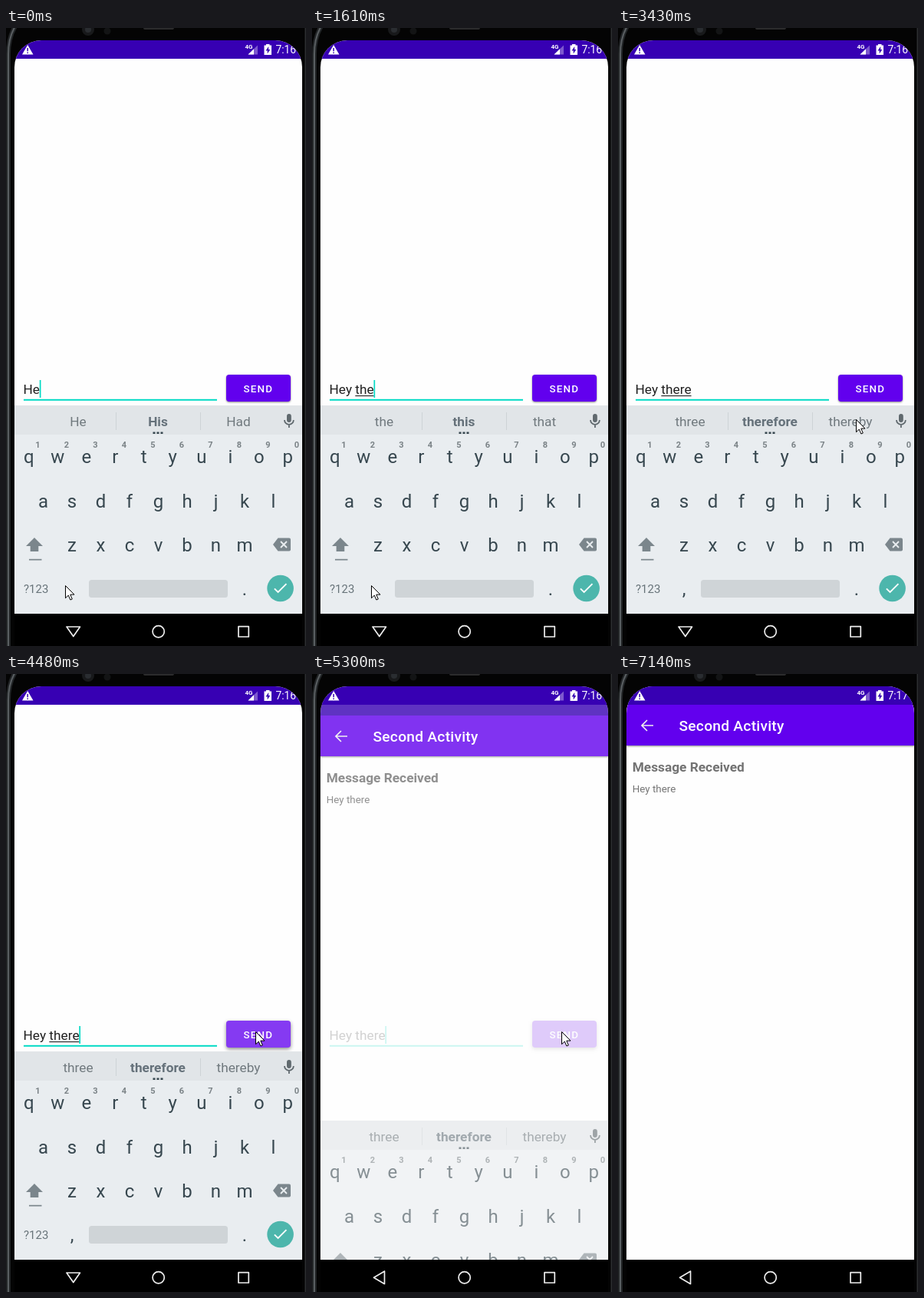
An HTML page that plays this animation: 391x804 px, repeating every 7.67 s.

```html
<!DOCTYPE html>
<html lang="en">
<head>
<meta charset="utf-8">
<title>Send a message</title>
<style>
  html, body { margin: 0; width: 100%; height: 100%; overflow: hidden; background: #000; }
  svg { display: block; width: 391px; height: 804px; }
  text { font-family: Roboto, sans-serif; white-space: pre; }
  .mid { text-anchor: middle; }
  .body { font-size: 17.3px; }
  .key { font-size: 24px; fill: #37474f; text-anchor: middle; }
  .digit { font-size: 11px; font-weight: 700; fill: #7a8286; text-anchor: middle; }
  .raised { filter: drop-shadow(0 1px 1.3px #0007); }
  .pressed { filter: drop-shadow(0 2px 2.5px #0007); }
  .line { fill: none; stroke: #eee; stroke-width: 1.7; stroke-linejoin: round; }
</style>
</head>
<body>
<svg viewBox="0 0 391 804">
  <defs>
    <clipPath id="screenClip"><rect x="11" y="16" width="375" height="900" rx="35"/></clipPath>
    <clipPath id="buttonClip"><rect x="287" y="451" width="84" height="35" rx="4"/></clipPath>
  </defs>

  <!-- Phone frame -->
  <rect width="391" height="804" fill="#040404"/>
  <path d="M3 804V34Q3 12 13 -4" fill="none" stroke="#222527" stroke-width="6"/>
  <path d="M3 804V34Q3 12 13 -4" fill="none" stroke="#5a5f62" stroke-width="2"/>
  <rect x="389.5" width="1.5" height="804" fill="#2c2e30"/>
  <circle cx="107" cy="2" r="8" fill="#18191b"/>
  <circle cx="107" cy="2" r="4" fill="#2a2d31"/>
  <circle cx="132" cy="4" r="4.5" fill="#131415"/>
  <rect x="179" y="-4" width="40" height="6" rx="2" fill="#2b2b2c"/>

  <g clip-path="url(#screenClip)">
    <rect x="11" y="16" width="375" height="746" fill="#fefefe"/>

    <!-- Compose screen -->
    <g id="compose">
      <text id="draft" class="body" x="22.5" y="476" fill="#212121"></text>
      <rect id="composing" y="478" height="1.1" fill="#212121"/>
      <rect x="23" y="482.8" width="252" height="2" fill="#03dac5"/>
      <rect id="caret" y="458" width="1.7" height="23" fill="#03dac5"/>
      <rect id="button" x="287" y="451" width="84" height="35" rx="4" fill="#6200ee"/>
      <g clip-path="url(#buttonClip)" fill="#fff">
        <rect id="hover" x="287" y="451" width="84" height="35"/>
        <circle id="ripple" cx="325" cy="465" opacity=".16"/>
      </g>
      <text x="309.5" y="473.5" font-size="13.4" font-weight="500" letter-spacing="1.2" fill="#fff">SEND</text>
    </g>

    <!-- Received screen -->
    <g id="received">
      <rect x="11" y="16" width="375" height="746" fill="#fefefe"/>
      <rect class="raised" x="11" y="40" width="375" height="53" fill="#6200ee"/>
      <rect x="11" y="16" width="375" height="24" fill="#3700b3"/>
      <path class="line" d="M46 67H31.5M38 60L31 67L38 74" style="stroke-linejoin:miter"/>
      <text x="79.5" y="74" font-size="19.2" font-weight="500" letter-spacing=".24" fill="#fff">Second Activity</text>
      <text x="18.7" y="127" class="body" font-weight="700" fill="#737373">Message Received</text>
      <text x="18.7" y="154" font-size="13.4" fill="#757575">Hey there</text>
    </g>

    <!-- Keyboard -->
    <g id="keyboard">
      <rect x="11" y="491" width="375" height="271" fill="#e9edf0"/>
      <rect x="11" y="491" width="375" height="38" fill="#e1e5e8"/>
      <path d="M143.5 500V523M253.5 500V523" stroke="#cdd3d6"/>
      <g class="body mid" fill="#70797e">
        <text class="hint" x="94" y="518"></text>
        <text class="hint" x="198" y="518" font-weight="700" fill="#65717a"></text>
        <text class="hint" x="303" y="518"></text>
      </g>
      <path id="dots" d="M191.5 526.7h3M196.5 526.7h3M201.5 526.7h3" stroke="#37474f" stroke-width="2.4"/>
      <g stroke="#60696e" stroke-width="1.8" fill="none">
        <rect x="366.9" y="503" width="4" height="9" rx="2" fill="#60696e"/>
        <path d="M363 510a5.9 5.9 0 0 0 11.8 0M368.9 516V520"/>
      </g>
      <g id="keys"></g>
      <g fill="#7b868c">
        <path d="M37 663L48 674H42.3V681H31.7V674H26Z"/>
        <rect x="30" y="690.8" width="16.5" height="1.7"/>
        <path d="M354.5 663.5H369a2 2 0 0 1 2 2V678.5a2 2 0 0 1-2 2H354.5L348 672Z"/>
      </g>
      <path d="M358 668L366 676M366 668L358 676" stroke="#e9edf0" stroke-width="1.9"/>
      <text x="23" y="735" font-size="15" fill="#68747a">?123</text>
      <text id="comma" class="key" x="86" y="738">,</text>
      <rect x="108" y="718" width="181" height="23" rx="3.5" fill="#cfd4d7"/>
      <text class="key" x="311" y="738">.</text>
      <circle cx="357.6" cy="729" r="17.3" fill="#4db6ac"/>
      <path d="M349.9 729.3L354.6 734L365.4 723.2" fill="none" stroke="#fff" stroke-width="1.9"/>
    </g>

    <!-- Status bar -->
    <rect x="11" y="16" width="375" height="24" fill="#3700b3"/>
    <path d="M28.2 22L35.5 34.5H21Z" fill="#fff"/>
    <path d="M28.2 26V30.3M28.2 31.4V33" stroke="#3700b3" stroke-width="1.5"/>
    <path d="M328 22.5V34.5H315.5Z" fill="#fff" opacity=".35"/>
    <path d="M323 27.3V34.5H315.5Z" fill="#fff"/>
    <text x="311.5" y="27.3" font-size="8" font-weight="700" fill="#fff">4G</text>
    <path d="M336.5 22.5H339V21H343.5V22.5H346V35H336.5Z" fill="#fff"/>
    <path d="M342.2 24L338.5 29.5H340.7V33.5L344.3 28H342.2Z" fill="#3700b3"/>
    <text id="clock" x="351.5" y="33" font-size="13.8" fill="#fff"></text>
  </g>

  <!-- Navigation bar -->
  <rect x="11" y="762" width="375" height="42" fill="#000"/>
  <path id="back" class="line"/>
  <circle class="line" cx="198.7" cy="785.2" r="7.6"/>
  <rect class="line" x="303" y="778.7" width="13.3" height="13.3"/>

  <path id="pointer" d="M.5 .5V16.7L4.3 13.1L6.9 19L9.3 18L6.8 12.1H12Z" fill="#fff" stroke="#000"/>
</svg>

<script>
const LOOP = 7670;
const el = id => document.getElementById(id);
const hints = document.querySelectorAll('.hint');
const measure = document.createElement('canvas').getContext('2d');

// Each track lists [start time, ...values]; a value holds until the next entry.
const drafts = [
  [0, 'He'], [120, 'Hey'], [390, 'Hey '], [1220, 'Hey t'], [1340, 'Hey th'],
  [1610, 'Hey the'], [1730, 'Hey ther'], [1850, 'Hey there']
];
const suggestions = [
  [0, 'He', 'His', 'Had'], [270, 'He', 'Hey', 'Her'], [540, '', '', ''],
  [1340, 'the', 'this', 'that'], [1730, 'the', 'there', 'them'],
  [1970, 'three', 'therefore', 'thereby']
];
const pointerTrack = [
  [0, 77, 725], [2740, 150, 715], [2860, 263, 697], [3020, 279, 691],
  [3160, 289, 578], [3310, 302, 535], [3430, 310, 509], [3740, 316, 492],
  [3860, 321, 478], [3980, 325, 465], [6260, 355, 598], [6410, 373, 686],
  [6690, 367, 708], [6840, 355, 779], [6990, 355, 785], [7140, 355, 900]
];
const caretTrack = [
  [0, 1], [940, 0], [1220, 1], [2430, 0], [3020, 1], [3430, 0], [3740, 1]
];
const rippleTrack = [[0, 0], [4360, 30], [4480, 70], [5180, 0]];
// Opacity and offset of the received screen, then of the keyboard.
const transition = [
  [0, 0, 50, 1, 0], [5180, .22, 50, 1, 0], [5300, .8, 14, .6, 90], [5450, 1, 0, 0, 0]
];

const at = (track, t) => track.findLast(entry => entry[0] <= t).slice(1);
const set = (id, attrs) => {
  for (const name in attrs) el(id).setAttribute(name, attrs[name]);
};

function buildKeys() {
  const label = (type, x, y, text) => `<text class="${type}" x="${x}" y="${y}">${text}</text>`;
  const row = (type, letters, x, y) =>
    [...letters].map((c, i) => label(type, x + i * 37.5, y, c)).join('');
  el('keys').innerHTML =
    row('key', 'qwertyuiop', 29.8, 566) + row('digit', '1234567890', 41.5, 546) +
    row('key', 'asdfghjkl', 48.5, 624) + row('key', 'zxcvbnm', 86, 681);
}

function textWidth(text) {
  measure.font = '17.3px Roboto, sans-serif';
  return measure.measureText(text).width;
}

function render(t) {
  const [draft] = at(drafts, t);
  const wordStart = draft.lastIndexOf(' ') + 1;
  const left = textWidth(draft.slice(0, wordStart));
  const right = textWidth(draft);
  const underlined = t >= 120 && t < 5180;
  el('draft').textContent = draft;
  set('composing', { x: 22.5 + left, width: underlined ? right - left : 0 });
  set('caret', { x: 22.3 + right, opacity: at(caretTrack, t)[0] });

  const words = at(suggestions, t);
  hints.forEach((hint, i) => hint.textContent = words[i]);
  set('dots', { opacity: words[0] ? 1 : 0 });

  set('button', { class: t < 4360 ? 'raised' : 'pressed' });
  set('hover', { opacity: t >= 3860 && t < 5180 ? .08 : 0 });
  set('ripple', { r: at(rippleTrack, t)[0] });

  const [alpha, shift, keyAlpha, keyShift] = at(transition, t);
  set('compose', { opacity: t < 5450 ? 1 : 0 });
  set('received', { opacity: alpha, transform: `translate(0 ${shift})` });
  set('keyboard', { opacity: keyAlpha, transform: `translate(0 ${keyShift})` });
  set('comma', { opacity: t < 2740 ? 0 : 1 });

  el('clock').textContent = t < 6690 ? '7:16' : '7:17';
  set('back', { d: t < 5180 ? 'M79 779H96.5L87.8 791.5Z' : 'M94.5 777V793.5L80.5 785.2Z' });
  set('pointer', { transform: `translate(${at(pointerTrack, t)})` });
}

buildKeys();
const start = performance.now();
function tick() {
  render((performance.now() - start) % LOOP);
  requestAnimationFrame(tick);
}
tick();
</script>
</body>
</html>
```
